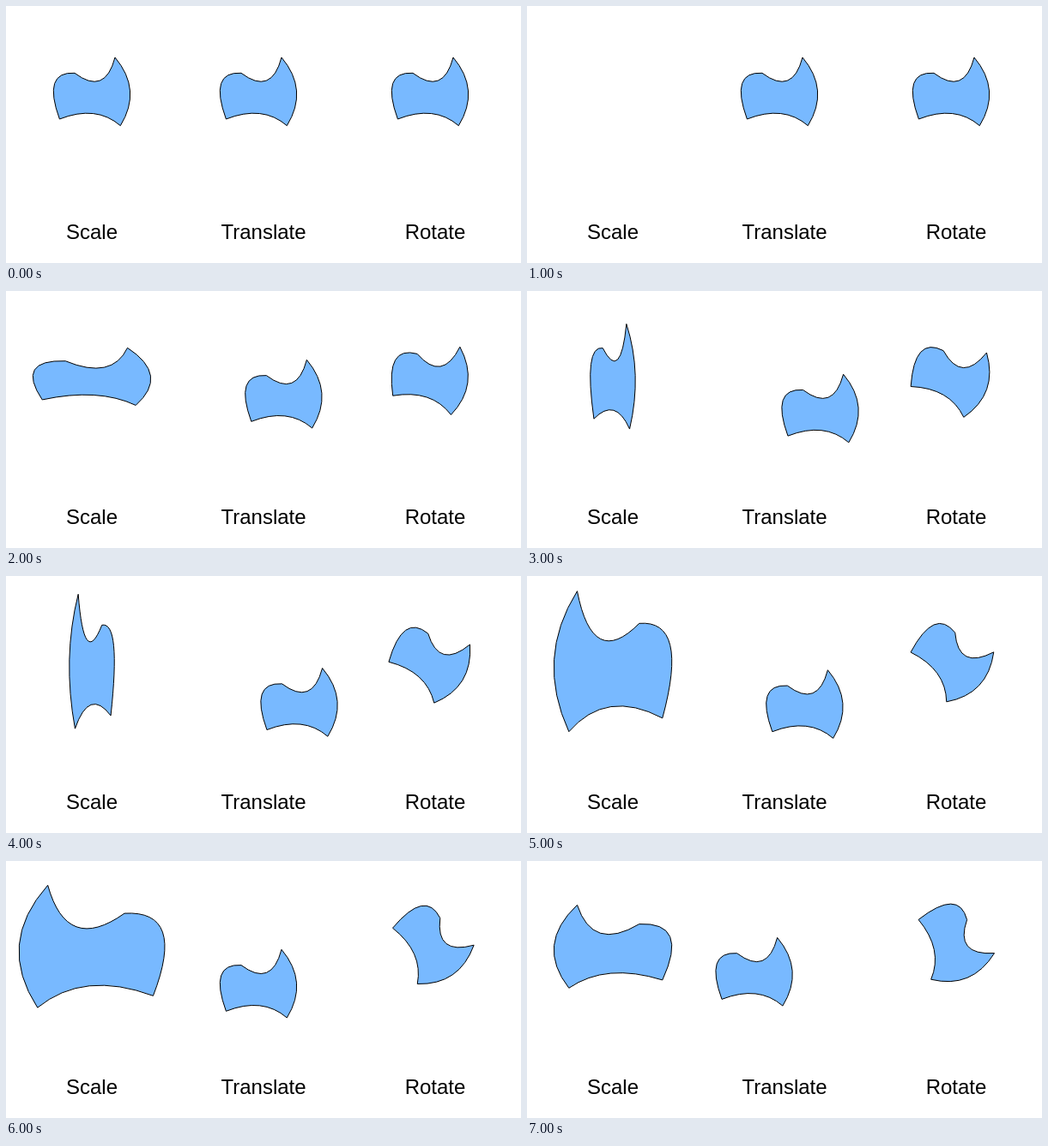
An HTML page with a canvas for the animation above (8 s loop, 600x300 px).

```html
<!DOCTYPE html>
<html lang="en">
<head>
<meta charset="utf-8">
<title>Scale, translate, rotate</title>
<style>
  html, body { margin: 0; width: 600px; height: 300px; overflow: hidden; background: #fff; }
  canvas { position: absolute; left: 0; top: 0; display: block; }
  p {
    position: absolute; top: 250px; width: 200px; margin: 0; text-align: center;
    font: 24px/27px "Liberation Sans", Arial, sans-serif; color: #000;
  }
</style>
</head>
<body>
<canvas id="stage" width="600" height="300"></canvas>
<p style="left: 0">Scale</p>
<p style="left: 200px">Translate</p>
<p style="left: 400px">Rotate</p>
<script>
const ctx = document.getElementById('stage').getContext('2d');
const STEP = 1000, STEPS = 8;
const OFFSET = -6; // the moving and turning shapes sit left of their pivots
const rad = deg => deg * Math.PI / 180;

const blob = new Path2D(`M-37.6 32 Q5 15.2 33.3 39.7 Q58.9 -2 27 -40
  Q15.3 5 -20 -21.7 Q-58 -24 -37.6 32Z`);

// The path is transformed, but the outline keeps its width.
function drawBlob(matrix) {
  const path = new Path2D();
  path.addPath(blob, matrix);
  ctx.fill(path);
  ctx.stroke(path);
}

function draw(step) {
  ctx.clearRect(0, 0, 600, 300);
  ctx.fillStyle = '#78b9ff';
  ctx.strokeStyle = '#000';
  ctx.lineWidth = 1;
  ctx.lineJoin = 'round';

  const k = Math.max(0, step - 1);
  const fast = rad(36 * k), slow = rad(24 * k);

  // At rest the scale is 1; the first turn flattens the shape to nothing.
  const sx = step ? 1.9 * Math.cos(fast) : 1;
  const sy = step ? 2.07 * Math.sin(slow) : 1;
  if (sy) drawBlob(new DOMMatrix([sx, 0, 0, sy, 100, 100]));

  drawBlob(new DOMMatrix().translate(
    300 + OFFSET + 50 * Math.sin(fast), 100 + 50 * Math.sin(slow)));

  drawBlob(new DOMMatrix().translate(500, 100).rotate(12 * k).translate(OFFSET, 0));
}

const start = performance.now();
let shown = -1;
function tick() {
  const step = Math.floor((performance.now() - start) / STEP) % STEPS;
  if (step !== shown) draw(shown = step);
  requestAnimationFrame(tick);
}
tick();
</script>
</body>
</html>
```
